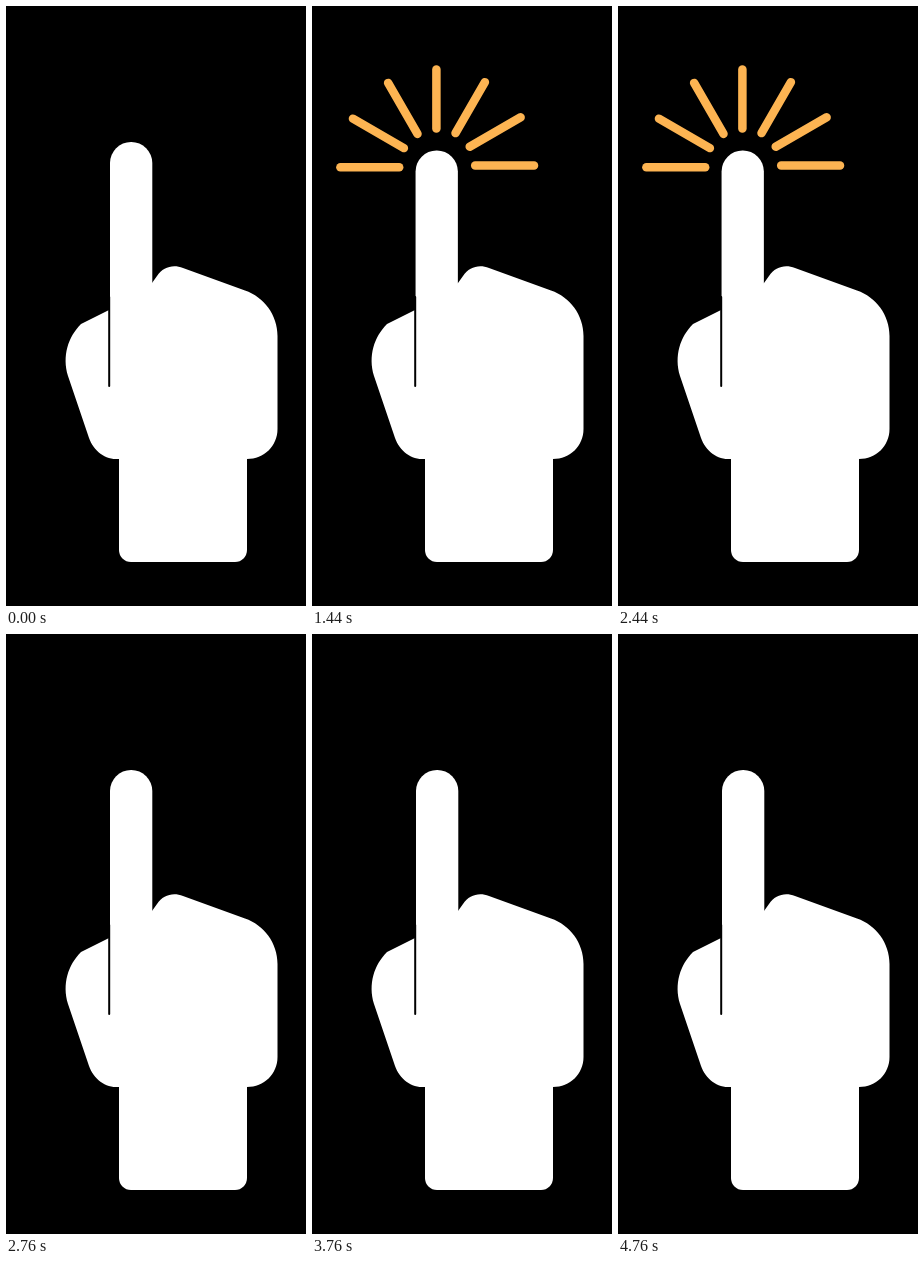
Write an HTML page with a canvas that moves like this. It is 300 px wide and 600 px high and loops after 5 s.

```html
<!DOCTYPE html>
<html lang="en">
<head>
<meta charset="utf-8">
<title>Tapping finger</title>
<style>
html, body { margin: 0; width: 100%; height: 100%; overflow: hidden; background: #000; }
canvas { display: block; width: 300px; height: 600px; }
</style>
</head>
<body>
<canvas id="stage" width="300" height="600"></canvas>
<script>
const ctx = document.getElementById('stage').getContext('2d');
const PERIOD = 1000, STEP = 40;
const START = 240, PEAK = 500, END = 760;
const INNER = 38, OUTER = 106;

const palm = new Path2D(`M113 453 H110 C97 453 86 443 82 429 L62 370
  C56 350 62 331 75 318 L103 304 L146 277 L151 270
  C157 261 167 258 177 262 L239 284.500
  C258 291 271.500 309 271.500 330 V423
  C271.500 440 258 453 241 453 Z`);

function ease(t, from, to) {
  const u = Math.min(1, Math.max(0, (t - from) / (to - from)));
  return u * u * (3 - 2 * u);
}

function box(x, y, w, h, radii) {
  ctx.beginPath();
  ctx.roundRect(x, y, w, h, radii);
  ctx.fill();
}

function drawRays(grow, trim) {
  if (grow <= 0 || trim >= 1) return;
  const span = OUTER - INNER;
  ctx.strokeStyle = '#fdb452';
  ctx.lineWidth = 8.5;
  ctx.lineCap = 'round';
  for (let i = 0; i < 7; i++) {
    ctx.save();
    ctx.translate(125.2, 160.4);
    ctx.rotate(-Math.PI * i / 6);
    ctx.beginPath();
    ctx.moveTo(INNER + span * trim, -0.8);
    ctx.lineTo(INNER + span * grow, -0.8);
    ctx.stroke();
    ctx.restore();
  }
}

function drawHand(press) {
  ctx.fillStyle = '#fff';
  box(113, 440, 128, 116, [0, 0, 12, 12]);
  ctx.fill(palm);
  const top = 136 + 9.8 * press;
  box(104 - 0.5 * press, top, 42.3, 370 - top, [21, 21, 0, 0]);

  // crease beside the finger
  ctx.fillStyle = '#000';
  box(102.2, 290, 2, 91, 1);
}

function draw(now) {
  const t = Math.floor((now % PERIOD) / STEP) * STEP;
  const down = ease(t, START, PEAK);
  const up = ease(t, PEAK, END);
  ctx.fillStyle = '#000';
  ctx.fillRect(0, 0, 300, 600);
  drawRays(down, up);
  drawHand(down - up);
}

let origin;
function tick(now) {
  origin ??= now;
  draw(now - origin);
  requestAnimationFrame(tick);
}
draw(0);
requestAnimationFrame(tick);
</script>
</body>
</html>
```
